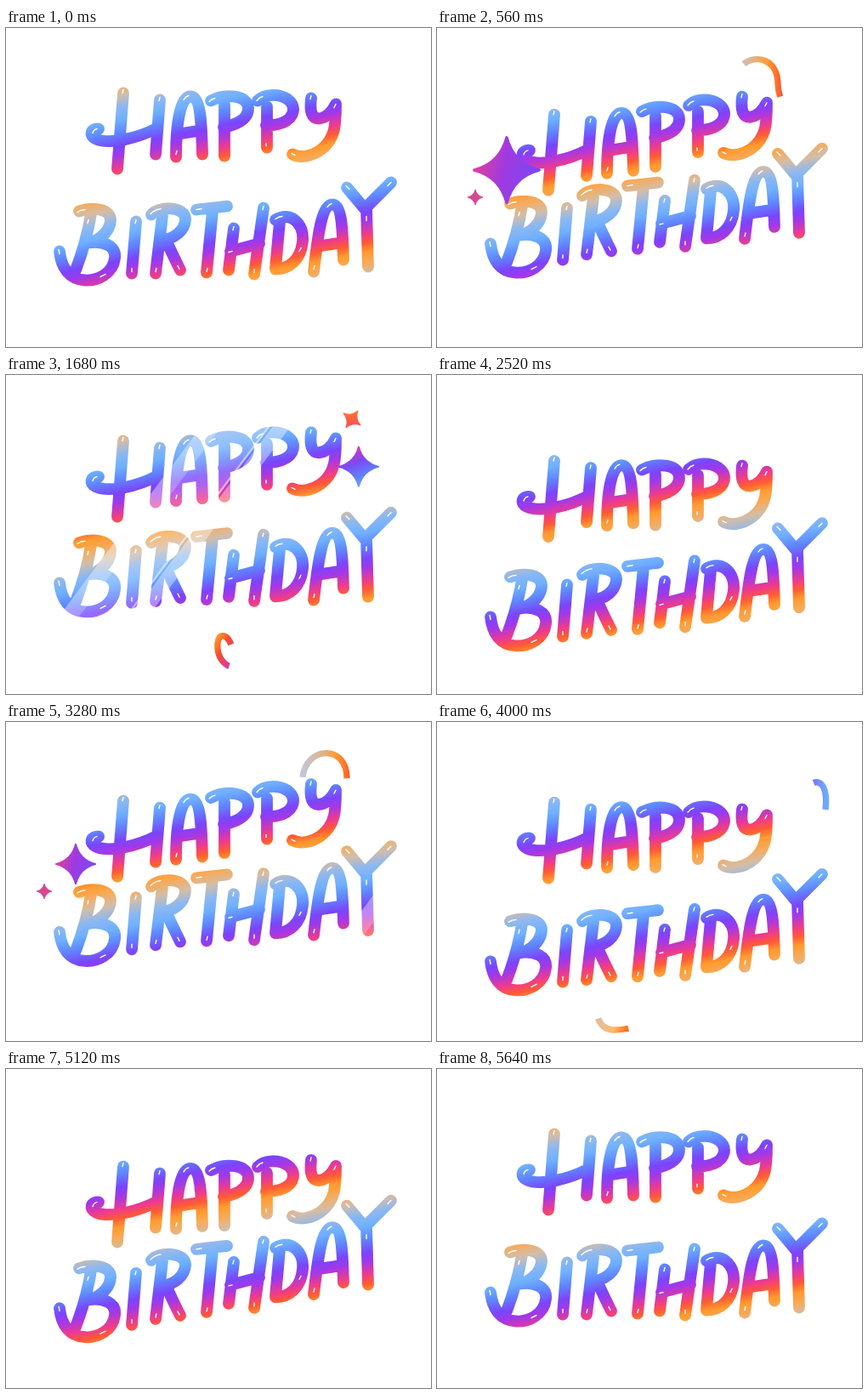
An HTML page that plays this animation: 500 by 375 pixels, repeating every 5.68 s.

```html
<!DOCTYPE html>
<html lang="en">
<head>
<meta charset="utf-8">
<title>Happy Birthday</title>
<style>
html, body { margin: 0; width: 100%; height: 100%; overflow: hidden; background: #fff; }
svg { display: block; width: 500px; height: 375px; }
#letters { stroke: #fff; stroke-width: 13.8; }
#letters .glint { stroke: #000; stroke-width: 1.4; }
#letters, .ribbon { fill: none; stroke-linejoin: round; }
#letters { stroke-linecap: round; }
.ribbon { stroke-width: 7.3; }
.star { stroke-width: .09; stroke-linejoin: round; }
</style>
</head>
<body>
<svg id="stage" viewBox="0 0 500 375" role="img" aria-label="Happy Birthday">
  <defs>
    <linearGradient id="rainbow" gradientUnits="userSpaceOnUse" spreadMethod="repeat" x1="0" y1="213" x2="26" y2="342.8">
      <stop offset="0" stop-color="#ff9a2e"/>
      <stop offset=".09" stop-color="#f7aa58"/>
      <stop offset=".2" stop-color="#d3bda8"/>
      <stop offset=".31" stop-color="#8db8f0"/>
      <stop offset=".42" stop-color="#6fb0ff"/>
      <stop offset=".53" stop-color="#5f86ff"/>
      <stop offset=".65" stop-color="#7a45fa"/>
      <stop offset=".73" stop-color="#a238e8"/>
      <stop offset=".84" stop-color="#ee3a8e"/>
      <stop offset=".92" stop-color="#ff5a35"/>
      <stop offset="1" stop-color="#ff9a2e"/>
    </linearGradient>
    <linearGradient id="topInk" gradientUnits="userSpaceOnUse" x1="296" y1="0" x2="457" y2="0">
      <stop offset="0" stop-color="#6fa8ff"/>
      <stop offset=".33" stop-color="#c3c6d6"/>
      <stop offset=".47" stop-color="#dfb48c"/>
      <stop offset=".58" stop-color="#ff9a2e"/>
      <stop offset=".66" stop-color="#ff642a"/>
      <stop offset=".81" stop-color="#8040f8"/>
      <stop offset="1" stop-color="#6fa8ff"/>
    </linearGradient>
    <linearGradient id="lowInk" gradientUnits="userSpaceOnUse" x1="188" y1="342" x2="276.2" y2="394.9">
      <stop offset="0" stop-color="#d8bfa8"/>
      <stop offset=".26" stop-color="#ffb870"/>
      <stop offset=".38" stop-color="#ff7a1f"/>
      <stop offset=".45" stop-color="#fb4a2e"/>
      <stop offset=".62" stop-color="#d63aa0"/>
      <stop offset=".78" stop-color="#8a3cf5"/>
      <stop offset="1" stop-color="#5f86ff"/>
    </linearGradient>
    <linearGradient id="coolStar" x1=".3" y1="0" x2=".7" y2="1">
      <stop offset=".05" stop-color="#d63ac0"/>
      <stop offset=".38" stop-color="#7d48f2"/>
      <stop offset=".75" stop-color="#5f86ff"/>
      <stop offset="1" stop-color="#7aaaff"/>
    </linearGradient>
    <linearGradient id="hotStar" x1="0" y1="0" x2="1" y2="1">
      <stop offset=".1" stop-color="#ff7a2a"/>
      <stop offset=".9" stop-color="#f8455a"/>
    </linearGradient>
    <linearGradient id="warmStar" x1="0" y1=".4" x2="1" y2=".6">
      <stop offset="0" stop-color="#e0409a"/>
      <stop offset=".45" stop-color="#a03ae0"/>
      <stop offset="1" stop-color="#7a48f5"/>
    </linearGradient>
    <mask id="words" maskUnits="userSpaceOnUse" x="0" y="0" width="500" height="375">
      <g id="letters"></g>
    </mask>
  </defs>
  <g mask="url(#words)">
    <rect width="500" height="375" fill="url(#rainbow)"/>
    <g id="shine" fill="#fff" fill-opacity=".38">
      <rect width="24" height="375"/>
      <rect x="24" width="54" height="375" fill-opacity=".2"/>
      <rect x="78" width="3" height="375" fill-opacity=".6"/>
      <rect x="84" width="21" height="375"/>
    </g>
  </g>
</svg>
<script>
const LOOP = 5680, STEP = 40, WAVE = 1410, SCENE = 2 * WAVE;
const SWING = 21, LEAD = 212, LAG = 10.5;
const LIFT = { top: 2.5, low: -1.5 };

// each letter: strokes, then small glints
const HAPPY = [
  ["M138 74L131 163M109 116C100 115 97 124 106 128C122 135 155 127 178 115M181 82L176 146",
   "M138 70l-1 4M102 121q1 -4 5 -5M181 79l-1 4"],
  ["M200 149C200 120 203 78 217 78C230 78 230 115 231 146M203 122L229 118",
   "M209 82q2 -4 6 -5M201 142l-1 4"],
  ["M241 83C258 74 285 76 285 92C285 106 268 112 256 114M257 88L257 148",
   "M239 84q3 -3 7 -4"],
  ["M296 83C305 74 322 75 331 81C342 89 340 103 325 109C318 112 312 112 306 112M307 90L307 138",
   "M295 83q3 -4 7 -5M306 133l0 3"],
  ["M359 80C357 96 360 104 368 104C378 103 384 95 388 87C388 110 388 128 370 141C360 148 347 151 337 146",
   "M359 77l-1 4M386 91l2 -4M336 145l4 2"]
];
const BIRTHDAY = [
  ["M86 217C100 212 124 213 123 228C122 242 108 252 97 254C115 251 130 258 128 272C126 290 108 299 93 298C74 297 65 283 63 264M100 220C96 245 90 265 82 286",
   "M84 218q4 -3 9 -3M62 262l1 5M111 294l6 -3M97 227l-1 4"],
  ["M153 229L148 290", "M153 227l-1 4M148 284l0 4"],
  ["M171 221C180 210 212 211 211 227C210 240 198 248 188 250C194 264 200 276 205 286M184 222L176 290",
   "M170 220q5 -5 12 -6M177 284l-1 4M202 281l2 4"],
  ["M224 215L260 211M243 216L236 289", "M224 215l6 -1M237 284l-1 4"],
  ["M268 237L262 286M303 213L292 291M264 264L298 255",
   "M268 235l-1 4M303 211l-1 4M262 265l4 -1M292 285l0 4"],
  ["M317 227C335 216 351 232 349 252C347 274 333 285 317 285M322 229L317 284",
   "M317 226q4 -3 8 -3M345 264l2 -4"],
  ["M362 288C366 255 370 209 384 209C396 209 396 245 397 274M367 258L394 254",
   "M378 212q2 -3 5 -4M362 285l1 -4"],
  ["M401 189L422 214L453 183M424 214L426 282", "M400 187l4 4M449 187l4 -4M424 223l0 5"]
];

// ribbon segments; "from" and "to" hold [time, segment position]
const RIBBONS = [
  { ink: "topInk", start: "M296 62",
    segs: ["C300 7 346 7 349 65", "C353 28 401 26 401 66", "C402 86 414 108 426 97", "C436 62 462 60 457 103"],
    from: [[180, 0], [460, 1], [1120, 3], [1260, 4]],
    to: [[80, 0], [460, 2], [1120, 4]] },
  { ink: "lowInk", start: "M188 342",
    segs: ["C190 355 197 361 207 362", "C240 362 272 345 265 317", "C258 300 247 305 249 322C250 333 257 340 262 342",
           "C284 350 312 322 301 309", "C291 312 289 335 307 343", "C318 347 330 342 338 334"],
    from: [[1120, 0], [1680, 2], [1820, 4], [2060, 6]],
    to: [[1040, 0], [1120, 1], [1680, 3], [1820, 5], [2000, 6]] }
];

const BIG = [[-130, 0], [0, 24], [140, 46], [330, 0]];
const SMALL = [[-400, 0], [-300, 13], [0, 12], [140, 12], [340, 29], [520, 0]];
const STARS = [
  { peak: 460, size: BIG, k: 1, ink: "url(#warmStar)", at: () => [82, 167] },
  { peak: 460, size: SMALL, k: .78, ink: "#d8468e", at: () => [45, 199] },
  { peak: 1680, size: BIG, k: 1, ink: "url(#coolStar)", at: r => [404 + .455 * r, 111 - .136 * r] },
  { peak: 1680, size: SMALL, k: 1.05, ink: "url(#hotStar)", at: () => [407, 52], turn: [[0, 35], [140, 0]] }
];

const stage = document.getElementById("stage");
const shine = document.getElementById("shine");

function add(parent, tag, attrs) {
  const el = document.createElementNS("http://www.w3.org/2000/svg", tag);
  for (const k in attrs) el.setAttribute(k, attrs[k]);
  return parent.appendChild(el);
}

// linear interpolation in a table of [key, value]
function at(x, table) {
  if (x <= table[0][0]) return table[0][1];
  for (let i = 1; i < table.length; i++) {
    const [a, v] = table[i - 1], [b, w] = table[i];
    if (x <= b) return v + (w - v) * (x - a) / (b - a);
  }
  return table[table.length - 1][1];
}

const box = document.getElementById("letters");
const glyphs = [...HAPPY, ...BIRTHDAY].map(([strokes, glints], i) => {
  const el = add(box, "g", {});
  add(el, "path", { d: strokes });
  add(el, "path", { d: glints, class: "glint" });
  const lag = (LEAD + LAG * i) * Math.PI / 180;
  const lift = i < HAPPY.length ? LIFT.top : LIFT.low;
  return { el, lag, rest: lift - SWING * Math.cos(lag) };
});

for (const r of RIBBONS) {
  r.el = add(stage, "path", { class: "ribbon", stroke: `url(#${r.ink})` });
  let d = r.start;
  r.marks = [[0, 0]];
  r.segs.forEach((seg, i) => {
    d += seg;
    r.el.setAttribute("d", d);
    r.marks.push([i + 1, r.el.getTotalLength()]);
  });
}

for (const s of STARS) {
  s.el = add(stage, "path", {
    class: "star", fill: s.ink, stroke: s.ink,
    d: "M0-.96Q.2-.2 .96 0Q.2.2 0 .96Q-.2.2-.96 0Q-.2-.2 0-.96Z"
  });
}

function draw(t) {
  const phase = 2 * Math.PI * t / WAVE;
  for (const g of glyphs) {
    const dy = g.rest + SWING * Math.cos(phase - g.lag);
    g.el.setAttribute("transform", `translate(0 ${dy.toFixed(2)})`);
  }

  const left = -165 + 1.63 * (t % WAVE);
  shine.setAttribute("transform", `translate(${left} 0) skewX(-36.87)`);

  const c = t % SCENE;
  for (const r of RIBBONS) {
    const a = at(at(c, r.from), r.marks), b = at(at(c, r.to), r.marks);
    r.el.style.display = b - a > .5 ? "" : "none";
    r.el.setAttribute("stroke-dasharray", `${Math.max(b - a, 0)} 2000`);
    r.el.setAttribute("stroke-dashoffset", -a);
  }
  for (const s of STARS) {
    const age = c - s.peak, r = s.k * at(age, s.size);
    const [x, y] = s.at(r), turn = s.turn ? at(age, s.turn) : 0;
    s.el.style.display = r > .3 ? "" : "none";
    s.el.setAttribute("transform", `translate(${x} ${y}) rotate(${turn}) scale(${r})`);
  }
}

const begin = performance.now();
function tick() {
  const t = (performance.now() - begin) % LOOP;
  draw(Math.floor(t / STEP) * STEP);
  requestAnimationFrame(tick);
}
tick();
</script>
</body>
</html>
```
